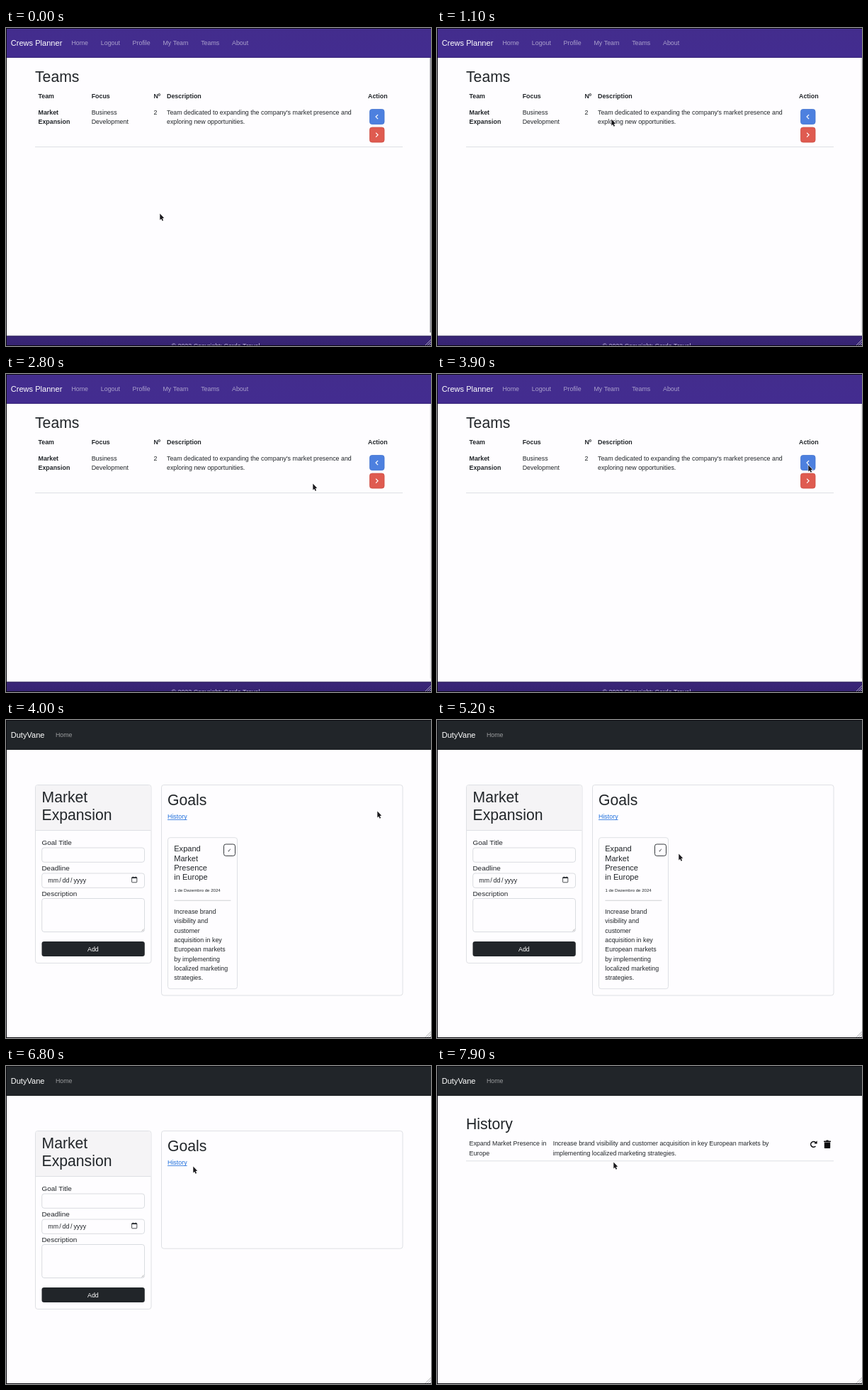
Recreate the animation shown at these times as an HTML page with a canvas. Size 600x448 px, loop 8000 ms.

```html
<!DOCTYPE html>
<html lang="en">
<head>
<meta charset="utf-8">
<title>Team goals</title>
<style>
  html, body { margin: 0; width: 100%; height: 100%; overflow: hidden; background: #fefdff; }
  canvas { display: block; width: 600px; height: 448px; }
</style>
</head>
<body>
<canvas id="stage" width="600" height="448"></canvas>
<script>
const ctx = document.getElementById('stage').getContext('2d');
const LOOP = 8000, STEP = 100;
const S = 0.5545;                    // page zoom
const BODY = 16 * S, LARGE = 20 * S, LABEL = 18 * S, H1 = 21.2, LINE = 24 * S;
const INK = '#212529', BG = '#fefdff', RULE = '#dee0e4';

// Pointer path: time, x, y
const PATH = [
  [0, 217, 262], [600, 230, 196], [1100, 246, 129], [1900, 340, 148],
  [2800, 433, 155], [3600, 525, 131], [3900, 524, 129], [4200, 524, 129],
  [4600, 416, 243], [4900, 416, 243], [5200, 341, 189], [5500, 312, 183],
  [6000, 312, 183], [6300, 342, 215], [6500, 342, 215], [6800, 264, 142],
  [7200, 251, 135], [7800, 251, 135], [7900, 249, 136], [8000, 249, 136]
];

function text(str, x, y, size = BODY, color = INK, weight = 'normal') {
  ctx.font = `${weight} ${size}px "Liberation Sans", Arial, sans-serif`;
  ctx.fillStyle = color;
  ctx.fillText(str, x, y);
  return ctx.measureText(str).width;
}

function lines(list, x, y, size = BODY, step = LINE, weight = 'normal') {
  list.forEach((str, i) => text(str, x, y + i * step, size, INK, weight));
}

function rect(x, y, w, h, color) {
  ctx.fillStyle = color;
  ctx.fillRect(x, y, w, h);
}

function box(x, y, w, h, r, fill, stroke, width = 1) {
  ctx.beginPath();
  ctx.roundRect(x, y, w, h, r);
  if (fill) { ctx.fillStyle = fill; ctx.fill(); }
  if (stroke) { ctx.strokeStyle = stroke; ctx.lineWidth = width; ctx.stroke(); }
}

function stroke(points, color, width) {
  ctx.beginPath();
  points.forEach(([x, y]) => ctx.lineTo(x, y));
  ctx.strokeStyle = color;
  ctx.lineWidth = width;
  ctx.stroke();
}

function vertical(y0, y1, top, bottom) {
  const g = ctx.createLinearGradient(0, y0, 0, y1);
  g.addColorStop(0, top);
  g.addColorStop(1, bottom);
  return g;
}

function nav(brand, links, x, fill) {
  rect(0, 0, 600, 42, fill);
  text(brand, 6.7, 24.9, LARGE, '#fff');
  for (const link of links) {
    x += text(link, x, 24.2, BODY, 'rgba(255,255,255,.55)') + 16 * S * 2;
  }
}

function frame() {
  rect(0, 0, 600, 1, '#0b0a10');
  rect(0, 0, 1, 448, '#0b0a10');
  rect(0, 447, 600, 1, '#0b0a10');
}

function grip(color) {
  for (const d of [2, 5, 8]) stroke([[600 - d, 447], [600, 447 - d]], color, 0.9);
}

function actionButton(y, fill, edge, dir) {
  box(513.5, y, 20.5, 21, 3.3, fill, edge, 0.8);
  const cx = 523.6, cy = y + 10.6;
  stroke([[cx - dir * 1.5, cy - 3], [cx + dir * 1.5, cy], [cx - dir * 1.5, cy + 3]], '#fff', 1.2);
}

function teamsPage(t) {
  nav('Crews Planner', ['Home', 'Logout', 'Profile', 'My Team', 'Teams', 'About'], 92.4,
    vertical(0, 42, '#432d8d', '#432c90'));
  rect(0, 41, 600, 1, '#38257a');

  text('Teams', 41, 75.5, H1);
  [['Team', 45.5], ['Focus', 120.7], ['Nº', 208.4], ['Description', 227], ['Action', 511]]
    .forEach(([str, x]) => text(str, x, 99.2, BODY, INK, 'bold'));
  const y = 121.7;
  lines(['Market', 'Expansion'], 45.5, y, BODY, LINE, 'bold');
  lines(['Business', 'Development'], 120.7, y);
  text('2', 208.4, y);
  lines(["Team dedicated to expanding the company's market presence and",
    'exploring new opportunities.'], 227, y);
  actionButton(114.5, '#4d80df', '#4474cf', -1);
  actionButton(140, '#df5b50', '#cc4c43', 1);
  rect(41, 167, 519, 1, RULE);

  rect(0, 434, 600, 14, vertical(434, 448, '#3a2678', '#352370'));
  rect(0, 433.5, 600, 1, '#221650');
  text('© 2023 Copyright: Corda Travel', 233.5, 451.3, BODY, '#c4bcdf');

  // fading scrollbar
  const fade = Math.max(0.12, 0.6 * (1 - Math.max(0, t - 400) / 600));
  rect(598.5, 42, 1.5, 387, `rgba(60,60,70,${fade})`);
  frame();
  grip('#b9b4c8');
}

function darkPage() {
  nav('DutyVane', ['Home'], 69.9, '#212529');
  rect(0, 41, 600, 1, '#181b1e');
  frame();
  grip('#a9a9ad');
}

function goalForm() {
  box(41.5, 91.5, 163.5, 251, 3.3, BG, RULE);
  box(42, 92, 162.5, 63.5, [3, 3, 0, 0], '#f5f4f6');
  rect(42, 155, 162.5, 1, RULE);
  lines(['Market', 'Expansion'], 50.5, 115.6, H1, 25.4);

  text('Goal Title', 50.4, 175.8, LABEL);
  text('Deadline', 50.4, 211.7, LABEL);
  text('Description', 50.4, 247.5, LABEL);
  for (const [y, h] of [[180, 20.3], [216, 20.3], [251.5, 47]]) {
    box(50.7, y, 144.8, h, 3.3, BG, '#d0d4d9', 0.8);
  }
  [['mm', 59.3], ['/', 75.2], ['dd', 79.6], ['/', 91], ['yyyy', 95.4]]
    .forEach(([str, x]) => text(str, x, 228.9));
  box(177.6, 221.8, 7.2, 7, 0.8, null, INK, 0.8);
  rect(177.4, 221.5, 7.6, 1.5, INK);
  rect(178.8, 220.6, 1, 1.2, INK);
  rect(182.6, 220.6, 1, 1.2, INK);
  stroke([[191.5, 297.5], [194.5, 294.5]], '#888', 0.6);
  stroke([[193.3, 297.5], [194.5, 296.3]], '#888', 0.6);

  box(50.5, 312, 145.3, 21, 3.3, INK);
  text('Add', 115, 325.6, BODY, '#fff');
}

function goalCard() {
  box(228.5, 165.7, 98, 213, 3.3, BG, RULE);
  lines(['Expand', 'Market', 'Presence', 'in Europe'], 237.2, 185.3, LARGE, LARGE * 1.2);
  box(307.5, 175, 16, 16.4, 2.8, BG, INK, 0.9);
  ctx.font = '7px "DejaVu Sans", sans-serif';
  ctx.fillStyle = INK;
  ctx.fillText('✓', 312.4, 185.7);
  text('1 de Dezembro de 2024', 237.5, 241.5, 11 * S);
  rect(237.4, 253.8, 80, 0.8, '#c4c5c8');
  lines(['Increase brand', 'visibility and', 'customer', 'acquisition in key',
    'European markets', 'by implementing', 'localized marketing', 'strategies.'], 237.3, 273.1);
}

function goalsPage(t) {
  const open = t < 6100;
  darkPage();
  goalForm();
  box(219.5, 91.5, 340.5, open ? 296.5 : 165.7, 3.3, BG, RULE);
  text('Goals', 228, 120.4, H1);
  const w = text('History', 228, 139.2, BODY, '#1f6fdc');
  rect(228, 140.2, w, 0.8, '#1f6fdc');
  if (open) goalCard();
}

function redoIcon(x, y) {
  ctx.beginPath();
  ctx.arc(x, y, 3.9, 0.75, Math.PI * 2 - 0.65);
  ctx.strokeStyle = '#0c0c0e';
  ctx.lineWidth = 1.5;
  ctx.stroke();
  ctx.beginPath();
  ctx.moveTo(x + 5, y - 5);
  ctx.lineTo(x + 5, y - 0.8);
  ctx.lineTo(x + 0.8, y - 0.8);
  ctx.fillStyle = '#0c0c0e';
  ctx.fill();
}

function trashIcon(x, y) {
  box(x - 5, y - 4.8, 10, 1.5, 0.5, '#0c0c0e');
  box(x - 1.7, y - 5.8, 3.4, 1.5, 0.5, '#0c0c0e');
  box(x - 4.2, y - 2.7, 8.4, 8.6, [0, 0, 1.2, 1.2], '#0c0c0e');
}

function historyPage() {
  darkPage();
  text('History', 41, 88.7, H1);
  lines(['Expand Market Presence in', 'Europe'], 45.5, 112.3);
  lines(['Increase brand visibility and customer acquisition in key European markets by',
    'implementing localized marketing strategies.'], 163.7, 112.3);
  redoIcon(531.6, 110.3);
  trashIcon(551, 110.2);
  rect(41, 133.3, 519, 1, RULE);
}

function pointerAt(t) {
  const i = Math.max(1, PATH.findIndex(p => p[0] >= t));
  const [t0, x0, y0] = PATH[i - 1], [t1, x1, y1] = PATH[i];
  const k = (t - t0) / (t1 - t0);
  return [x0 + (x1 - x0) * k, y0 + (y1 - y0) * k];
}

function pointer(t) {
  const [x, y] = pointerAt(t);
  ctx.beginPath();
  [[0, 0], [0, 8.8], [1.9, 7.1], [3.3, 10.2], [4.8, 9.5], [3.4, 6.5], [5.9, 6.2]]
    .forEach(([dx, dy]) => ctx.lineTo(x + 0.3 + dx, y - 0.4 + dy));
  ctx.closePath();
  ctx.strokeStyle = 'rgba(255,255,255,.85)';
  ctx.lineWidth = 1.2;
  ctx.stroke();
  ctx.fillStyle = '#1b1a1e';
  ctx.fill();
}

function draw(now) {
  const t = Math.floor((now % LOOP) / STEP) * STEP;
  rect(0, 0, 600, 448, BG);
  if (t < 4000) teamsPage(t);
  else if (t < 7500) goalsPage(t);
  else historyPage();
  pointer(t);
}

const start = performance.now();
function tick() {
  draw(performance.now() - start);
  requestAnimationFrame(tick);
}
tick();
</script>
</body>
</html>
```
